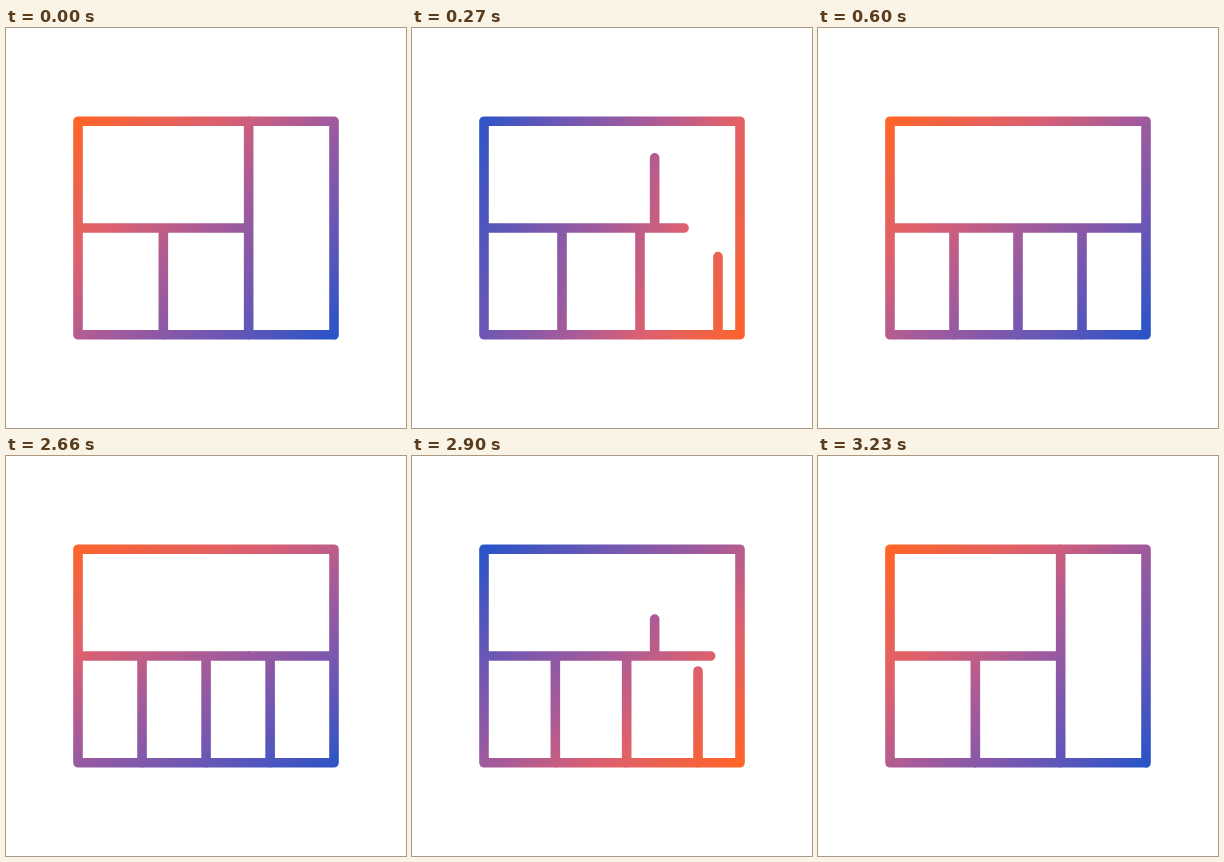
An HTML page for the animation above (5260 ms loop, 400 by 400 pixels).

```html
<!DOCTYPE html>
<html lang="en">
<head>
<meta charset="utf-8">
<title>Layout icon</title>
<style>
  html, body { margin: 0; width: 100%; height: 100%; overflow: hidden; background: #fff; }
  svg { display: block; width: 100vw; height: 100vh; }
  path { fill: none; stroke: url(#ink); stroke-width: 9.6; stroke-linecap: round; stroke-linejoin: round; }
</style>
</head>
<body>
<svg viewBox="0 0 400 400">
  <defs>
    <linearGradient id="ink" gradientUnits="userSpaceOnUse" x1="34" y1="200" x2="366" y2="200">
      <stop offset="0" stop-color="#ff6428"/>
      <stop offset=".3" stop-color="#dc6070"/>
      <stop offset=".5" stop-color="#a95b98"/>
      <stop offset=".75" stop-color="#6e57b4"/>
      <stop offset="1" stop-color="#2a54c8"/>
    </linearGradient>
  </defs>
  <path id="icon"/>
</svg>
<script>
const HALF = 2630, MOVE = 600, STEP = 30;
const LEFT = 72, RIGHT = 328, TOP = 93.2, MID = 200, BOTTOM = 306.8;
const COLUMN = (RIGHT - LEFT) / 3;
const icon = document.getElementById('icon');
const ink = document.getElementById('ink');

// Gradient turn in degrees by time, for opening and closing
const TURNS = [
  [[0, 0], [120, 45], [270, 155], [420, 270], [600, 360]],
  [[0, 0], [120, 55], [270, 180], [420, 280], [600, 360]]
];

const mix = (a, b, p) => a + (b - a) * p;
const bezier = (a, b, s) => 3 * (1 - s) ** 2 * s * a + 3 * (1 - s) * s * s * b + s ** 3;

// cubic-bezier(.7, 0, .3, 1)
function ease(x) {
  if (x <= 0 || x >= 1) return x <= 0 ? 0 : 1;
  let low = 0, high = 1;
  for (let i = 0; i < 24; i++) {
    const s = (low + high) / 2;
    if (bezier(.7, .3, s) < x) low = s; else high = s;
  }
  return bezier(0, 1, low);
}

function lookup(table, t) {
  const i = Math.max(1, table.findIndex(([time]) => time >= t));
  const [t0, v0] = table[i - 1], [t1, v1] = table[i];
  return mix(v0, v1, (t - t0) / (t1 - t0));
}

function shape(p) {
  const gap = mix(COLUMN, (RIGHT - LEFT) / 4, p);
  const divider = LEFT + 2 * COLUMN;
  const column = (n, top) => `M${LEFT + n * gap} ${top}V307`;
  return `M${LEFT} ${TOP}H${RIGHT}V${BOTTOM}H${LEFT}Z` +
    `M${LEFT} ${MID}H${mix(divider, RIGHT, p)}` +
    `M${divider} ${MID}V${mix(93, MID, p)}` +
    column(1, MID) + column(2, MID) + column(3, mix(243.5, MID, p));
}

function draw(now) {
  const time = now % (2 * HALF);
  const closing = time >= HALF ? 1 : 0;
  const t = Math.min(MOVE, Math.floor((time - closing * HALF) / STEP) * STEP);
  const p = ease(t / MOVE);
  icon.setAttribute('d', shape(closing ? 1 - p : p));
  ink.setAttribute('gradientTransform', `rotate(${45 + lookup(TURNS[closing], t)} 200 200)`);
}

const start = performance.now();
function tick() {
  draw(performance.now() - start);
  requestAnimationFrame(tick);
}
tick();
</script>
</body>
</html>
```
